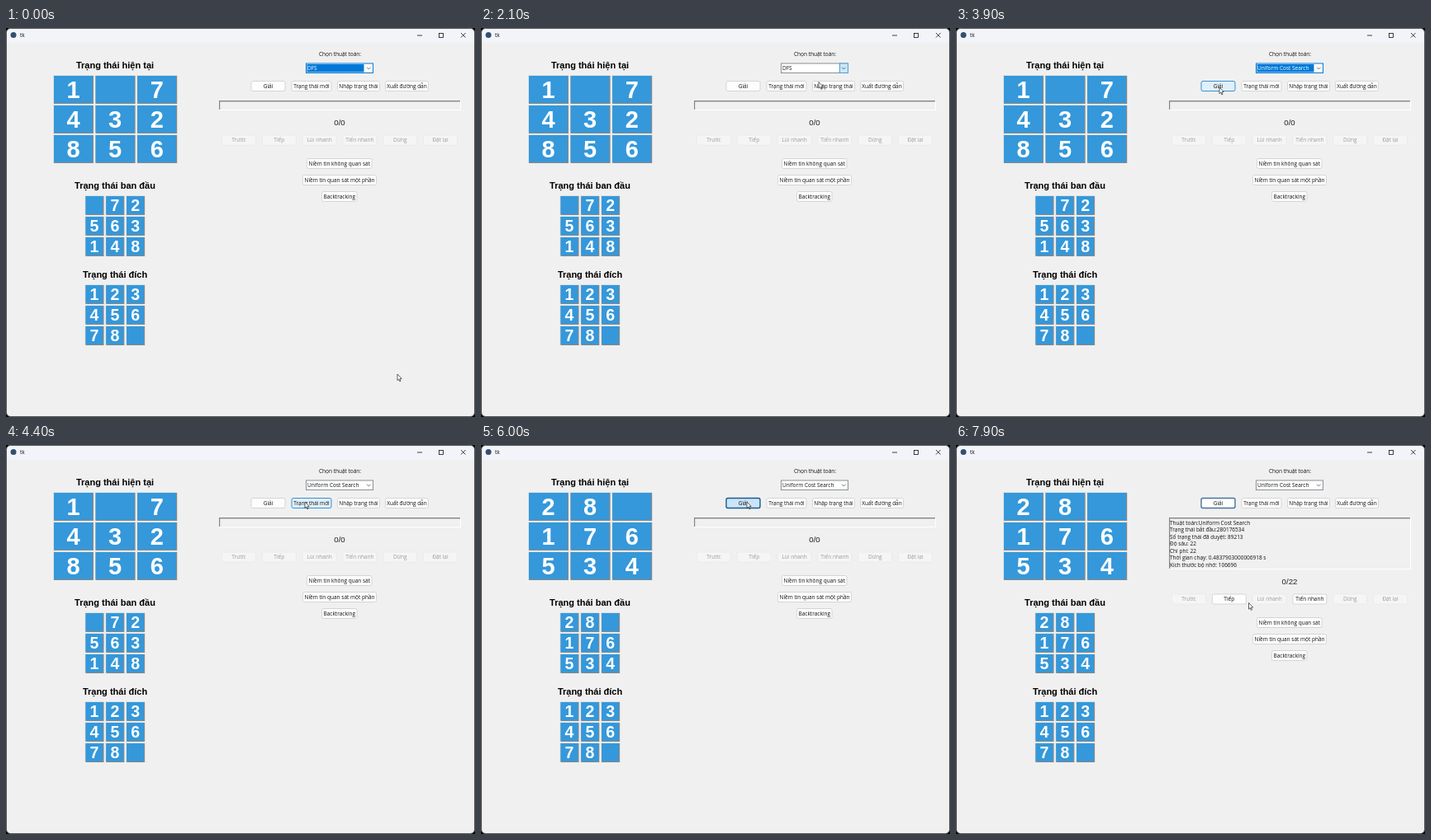
Recreate the animation shown at these times as an HTML page with a canvas. Size 568x472 px, loop 8 s.

```html
<!DOCTYPE html>
<html lang="vi">
<head>
<meta charset="utf-8">
<title>tk</title>
<style>
html, body { margin: 0; width: 100%; height: 100%; overflow: hidden; background: #000; }
canvas { display: block; width: 568px; height: 472px; }
</style>
</head>
<body>
<canvas id="stage"></canvas>
<script>
const LOOP = 8000, STEP = 100;
const UI = '6.5px "Open Sans", "Noto Sans", sans-serif';
const arial = (size, weight = '') => `${weight} ${size}px "Liberation Sans", Arial, sans-serif`;
const canvas = document.getElementById('stage');
const scale = window.devicePixelRatio || 1;
canvas.width = 568 * scale;
canvas.height = 472 * scale;
const c = canvas.getContext('2d');
c.scale(scale, scale);

// Pointer tip: [time, x, y]
const path = [
  [0, 474, 420], [200, 474, 420], [1100, 439, 48], [1400, 439, 48],
  [2100, 409, 65.5], [2400, 403, 75], [2800, 403, 75], [3700, 317, 70],
  [3900, 319, 72], [4400, 362, 69], [4600, 362, 69], [4900, 337, 141],
  [5200, 337, 145], [5700, 322, 69], [6300, 322, 69], [6600, 377, 145],
  [7300, 384, 193], [7900, 354.5, 191.5], [8000, 354.5, 191.5]
];
const result = [
  'Thuật toán:Uniform Cost Search', 'Trạng thái bắt đầu:280176534',
  'Số trạng thái đã duyệt: 89213', 'Độ sâu: 22', 'Chi phí: 22',
  'Thời gian chạy: 0.4837903000006918 s', 'Kích thước bộ nhớ: 106696'
];
const styles = {
  normal: ['#fdfdfd', '#d2d2d2', '#111'],
  disabled: ['#f6f5f6', '#ece9ea', '#9b9b9b'],
  hover: ['#e1eff9', '#2388cc', '#111'],
  pressed: ['#cce4f7', '#175c92', '#111'],
  focus: ['#fdfdfd', '#47749c', '#111']
};

function rect(x, y, w, h, fill) {
  c.fillStyle = fill;
  c.fillRect(x, y, w, h);
}

function text(s, x, y, font = UI, fill = '#111', align = 'center') {
  c.font = font;
  c.fillStyle = fill;
  c.textAlign = align;
  c.fillText(s, x, y);
}

function line(points, color, width = 0.8) {
  c.beginPath();
  points.forEach(([x, y]) => c.lineTo(x, y));
  c.strokeStyle = color;
  c.lineWidth = width;
  c.stroke();
}

function button(label, x, y, w, style = 'normal') {
  const [fill, edge, ink] = styles[style];
  c.beginPath();
  c.roundRect(x + 0.5, y + 0.5, w - 1, 12, 2);
  c.fillStyle = fill;
  c.fill();
  c.strokeStyle = edge;
  c.lineWidth = style === 'pressed' || style === 'focus' ? 1.4 : 0.9;
  c.stroke();
  text(label, x + w / 2, y + 8.8, UI, ink);
}

function board(title, state, x, y, w, h, pitchX, pitchY, size) {
  text(title, 132, y - 8, arial(11, 'bold'), '#000');
  [...state].forEach((d, i) => {
    const cx = x + i % 3 * pitchX, cy = y + Math.floor(i / 3) * pitchY;
    rect(cx, cy, w, h, '#d9e2e8');
    rect(cx + 1, cy + 1, w - 1, h - 1, '#868a8c');
    rect(cx + 1, cy + 1, w - 2.2, h - 2.2, '#3498db');
    if (d !== '0') text(d, cx + w / 2, cy + h / 2 + size * 0.35, arial(size, 'bold'), '#fff');
  });
}

function frame(active) {
  c.beginPath();
  c.roundRect(0.5, 0.5, 567, 471, 5);
  c.fillStyle = '#f0f0f0';
  c.fill();
  c.save();
  c.clip();
  rect(0, 0, 568, 18, '#f2f4fa');
  c.restore();
  c.strokeStyle = '#555';
  c.lineWidth = 1;
  c.stroke();
  const ink = active ? '#111' : '#999';
  c.beginPath();
  c.arc(9, 8.5, 3.5, 0, 7);
  c.fillStyle = '#34506f';
  c.fill();
  text('tk', 17, 11.2, UI, ink, 'left');
  line([[498, 9], [504, 9]], ink);
  c.strokeRect(524.5, 6.5, 5, 5);
  line([[551, 6], [556.5, 11.5]], ink);
  line([[556.5, 6], [551, 11.5]], ink);
}

function combo(value, selected, open) {
  rect(363, 42.5, 82, 12.5, selected ? '#0078d7' : '#8a9096');
  rect(364, 43.5, 80, 10.5, '#fff');
  if (selected) rect(364.5, 44, 69, 9.5, '#0078d7');
  if (open) {
    rect(434, 42.5, 11, 12.5, '#4d9fd6');
    rect(435, 43.5, 9, 10.5, '#cfe6f7');
  }
  text(value, 365, 51, UI, selected ? '#fff' : '#111', 'left');
  line([[437, 47.7], [439.3, 50], [441.6, 47.7]], '#555');
}

function output(done) {
  const h = done ? 63 : 12;
  rect(258, 88, 293, h, '#fff');
  rect(258, 88, 292, h - 1, '#858585');
  rect(259.2, 89.4, 290.8, h - 2.4, '#f0f0f0');
  if (done) result.forEach((s, i) => text(s, 259, 96.5 + i * 8.53, UI, '#111', 'left'));
}

function pointer(t) {
  const i = path.findIndex(p => p[0] > t);
  const [t0, x0, y0] = path[i - 1], [t1, x1, y1] = path[i];
  const u = (t - t0) / (t1 - t0), k = u * u * (3 - 2 * u);
  c.save();
  c.translate(x0 + (x1 - x0) * k, y0 + (y1 - y0) * k);
  c.beginPath();
  [[0, 0], [0, 7.6], [1.7, 6.1], [2.9, 8.9], [4, 8.4], [2.9, 5.7], [5.2, 5.5]]
    .forEach(([x, y]) => c.lineTo(x, y));
  c.closePath();
  c.fillStyle = '#fff';
  c.fill();
  c.strokeStyle = '#222';
  c.lineWidth = 0.7;
  c.stroke();
  c.restore();
}

function draw(t) {
  const within = (a, b) => t >= a && t < b;
  const renewed = t >= 4500, done = t >= 6400, shift = done ? 51 : 0;
  const state = renewed ? '280176534' : '107432856';
  const start = renewed ? state : '072563148';

  rect(0, 0, 568, 472, '#000');
  frame(!within(4600, 5200));
  board('Trạng thái hiện tại', state, 57, 57, 49, 35, 50.6, 36, 29);
  board('Trạng thái ban đầu', start, 95.5, 203, 23, 24, 24.8, 25, 19.5);
  board('Trạng thái đích', '123456780', 95.5, 311, 23, 24, 24.8, 25, 19.5);

  text('Chọn thuật toán:', 404.5, 34.2);
  combo(t < 2700 ? 'DFS' : 'Uniform Cost Search',
    t < 1300 || within(2700, 4400), within(1200, 2700));

  let solve = 'normal';
  if (within(3600, 4100) || within(5600, 5900)) solve = 'hover';
  if (within(5900, 6400)) solve = 'pressed';
  if (done) solve = 'focus';
  button('Giải', 296.5, 64, 42, solve);
  button('Trạng thái mới', 345.5, 64, 49, within(4300, 4700) ? 'hover' : 'normal');
  button('Nhập trạng thái', 401, 64, 52);
  button('Xuất đường dẫn', 459, 64, 53);

  output(done);
  text(done ? '0/22' : '0/0', 404, 118 + shift, arial(9.7), '#222');
  ['Trước', 'Tiếp', 'Lùi nhanh', 'Tiến nhanh', 'Dừng', 'Đặt lại'].forEach((s, i) =>
    button(s, 261 + i * 48.8, 129.5 + shift, 42, done && (i === 1 || i === 3) ? 'normal' : 'disabled'));
  button('Niềm tin không quan sát', 364, 158 + shift, 79.5);
  button('Niềm tin quan sát một phần', 359, 178 + shift, 90);
  button('Backtracking', 382, 198 + shift, 43.5);
  pointer(t);
}

function tick() {
  const t = performance.now() % LOOP;
  draw(Math.floor(t / STEP) * STEP);
  requestAnimationFrame(tick);
}
tick();
</script>
</body>
</html>
```
